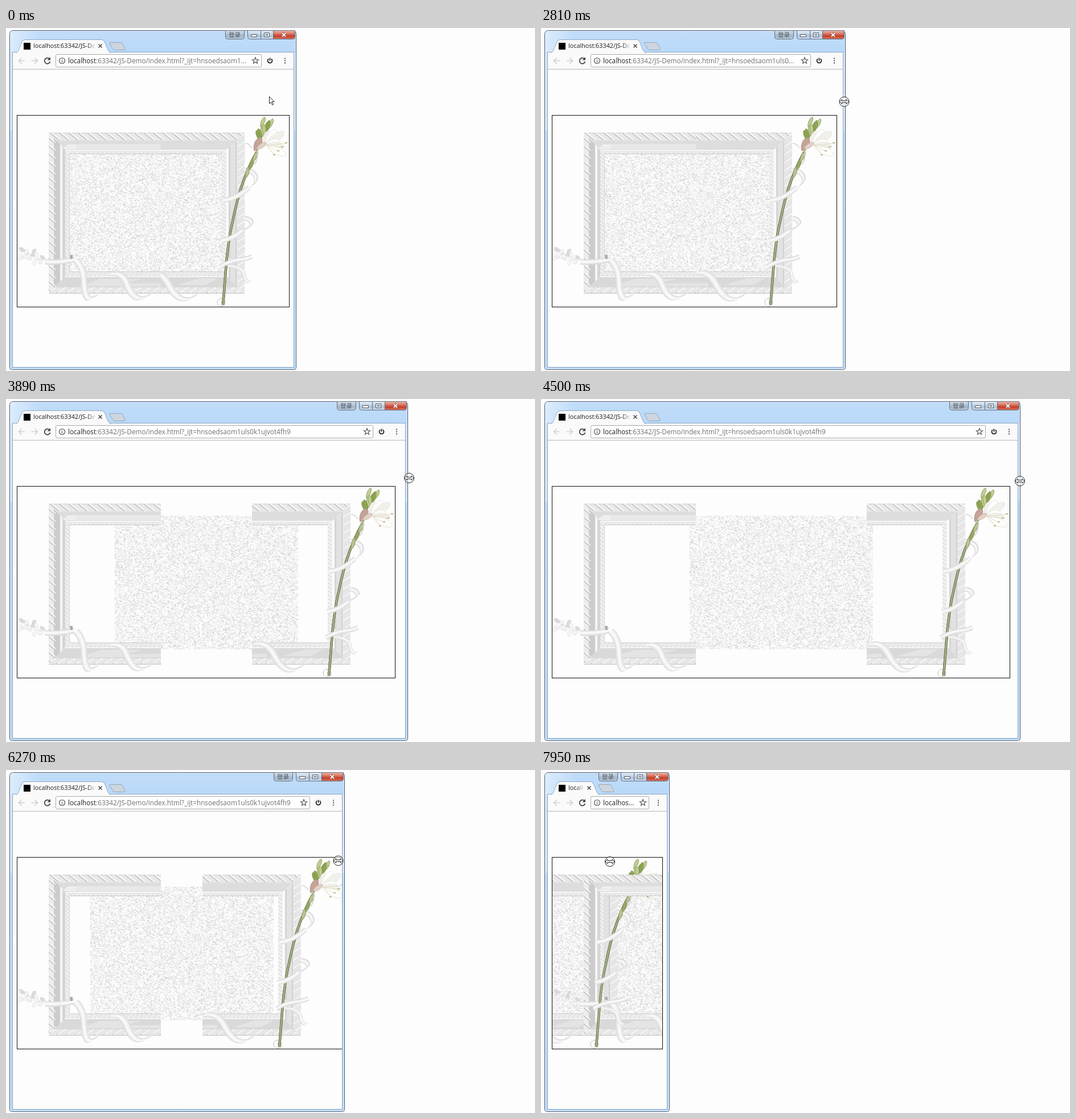
These frames come from a looping animation (929x603 px, 8000 ms). An HTML page with a canvas:

```html
<!DOCTYPE html>
<html lang="en">
<head>
<meta charset="utf-8">
<title>Responsive frame</title>
<style>
html, body { margin: 0; width: 929px; height: 603px; overflow: hidden; background: #fff; }
canvas { display: block; }
</style>
</head>
<body>
<canvas id="stage" width="929" height="603"></canvas>
<script>
const ctx = document.getElementById('stage').getContext('2d');
const LOOP = 8000;
const GRAB = 2390;
const MIN_EDGE = 226;
const UI = '"Open Sans", "Noto Sans", sans-serif';
const HOST = 'localhost';
const ADDRESS = HOST + ':63342/JS-Demo/index.html?_ijt=hnsoedsaom1uls0k1ujvot4fh9';

// ---- motion ----

// the screen refreshes in runs: start, interval, count
const TICKS = [
  [0, 0, 1], [1340, 120, 3], [1730, 120, 4], [2390, 120, 2], [2660, 150, 2], [2930, 120, 4],
  [3440, 150, 6], [4350, 150, 3], [4770, 150, 4], [5340, 120, 3], [5730, 150, 2],
  [6000, 150, 2], [6270, 120, 5], [6900, 150, 3], [7320, 120, 5], [7950, 0, 1]
].flatMap(([from, step, n]) => Array.from({ length: n }, (_, i) => from + i * step));

const HAND_X = [
  [0, 462], [1220, 462], [2090, 507], [2390, 508], [2810, 532.5], [3290, 582], [3440, 610],
  [3890, 708], [4190, 801], [4500, 841], [4770, 884], [5220, 910], [5340, 905], [5580, 846],
  [6000, 682], [6270, 583.5], [6750, 463.5], [7050, 380], [7800, 125], [7950, 121]
];
const HAND_Y = [[0, 120], [1970, 121], [2090, 129], [2810, 129.5], [5220, 150.5], [6750, 163.5], [7950, 161]];

function along(keys, t) {
  const i = keys.findIndex(k => k[0] > t);
  if (i < 0) return keys[keys.length - 1][1];
  const [t0, a] = keys[i - 1], [t1, b] = keys[i];
  return a + (b - a) * (t - t0) / (t1 - t0);
}

const handX = n => along(HAND_X, TICKS[Math.max(0, n)]);

// the window trails the hand, and the page trails the window
function edgeAt(n) {
  if (n < 0 || TICKS[n] < GRAB) return 510;
  const x = handX(n);
  return Math.max(MIN_EDGE, Math.round(x + 4 - 0.17 * (x - handX(n - 1))));
}

function pageAt(n) {
  const edge = edgeAt(n);
  return Math.round(edge - 13 - 0.3 * (edge - edgeAt(n - 1)));
}

// ---- drawing helpers ----

function layer(w, h, ox, oy, paint) {
  const c = document.createElement('canvas');
  c.width = w;
  c.height = h;
  const g = c.getContext('2d');
  g.translate(-ox, -oy);
  paint(g);
  return c;
}

function rect(g, color, x, y, w, h) {
  g.fillStyle = color;
  g.fillRect(x, y, w, h);
}

function path(g, d, stroke, width, fill) {
  const p = new Path2D(d);
  if (fill) { g.fillStyle = fill; g.fill(p); }
  if (stroke) { g.strokeStyle = stroke; g.lineWidth = width; g.stroke(p); }
}

function ramp(x0, y0, x1, y1, ...colors) {
  const r = ctx.createLinearGradient(x0, y0, x1, y1);
  colors.forEach((c, i) => r.addColorStop(i / (colors.length - 1), c));
  return r;
}

const grey = v => `rgb(${v},${v},${v})`;

let seed = 20;
const rnd = () => (seed = (seed * 16807) % 2147483647) / 2147483647;

// ---- artwork, laid out for a box spanning x 20..497 ----

// slanted leaves repeated along a moulding
function rope(g, x, y, dx, dy, a, b, w) {
  for (let px = x, py = y; px < 420 && py < 468; px += dx, py += dy) {
    path(g, `M${px} ${py}l${a} ${b}`, '#c6c6c6', w);
    path(g, `M${px + w} ${py - w / 2}l${a} ${b}`, '#fbfbfb', w);
  }
}

// bands: thickness and grey level, from the top or left
function rail(g, outline, upright, start, bands, ropes) {
  g.save();
  g.clip(new Path2D(outline));
  let at = start;
  for (const [size, v] of bands) {
    if (upright) rect(g, grey(v), at, 184, size, 284);
    else rect(g, grey(v), 75, at, 345, size);
    at += size;
  }
  ropes.forEach(r => rope(g, ...r));
  g.restore();
}

function frame(g) {
  rail(g, 'M75 184H419L379 222H112Z', false, 184,
    [[1, 205], [13, 232], [16, 221], [2, 246], [5, 233], [1, 208]],
    [[78, 185, 16.5, 0, 15, 12, 2], [97, 221, 8, 0, 6, -5, 1.2]]);
  rail(g, 'M75 184L112 222V428L75 467Z', true, 75,
    [[9, 236], [11, 204], [4, 245], [5, 213], [7, 238], [1, 208]],
    [[75, 180, 0, 14, 10, 8, 1.8], [104, 205, 0, 7, 7, 5, 1]]);
  rail(g, 'M379 222L419 184V467L379 428Z', true, 379,
    [[8, 240], [4, 250], [3, 212], [9, 226], [2, 210], [15, 230]],
    [[403, 196, 0, 14, 14, -9, 1.8], [379, 210, 0, 7, 7, 5, 1]]);
  rail(g, 'M75 467L112 428H379L419 467Z', false, 428,
    [[1, 204], [7, 234], [2, 246], [18, 217], [10, 231], [1, 198]],
    [[100, 436, 8, 0, 6, -6, 1.2], [72, 466, 16.5, 0, 14, -9, 2]]);
  path(g, 'M128 454L165 441H240L205 449L272 448V454ZM300 452L340 440H372L350 452Z', null, 0, '#e4e4e4');
}

// flat ribbon: one curve swept along a broad nib
function ribbon(g, d, dx, dy) {
  const n = Math.hypot(dx, dy);
  for (let i = 0; i <= n; i++) {
    g.save();
    g.translate((i / n - 0.5) * dx, (i / n - 0.5) * dy);
    path(g, d, grey(Math.round(218 + 32 * Math.sin(Math.PI * i / n))), 1.6);
    g.restore();
  }
}

function petal(g, x, y, len, wide, angle, fill, edge) {
  g.save();
  g.translate(x, y);
  g.rotate(angle);
  path(g, `M0 0C${len * 0.3} ${-wide} ${len * 0.9} ${-wide} ${len} 0C${len * 0.9} ${wide} ${len * 0.3} ${wide} 0 0Z`,
    edge, 0.7, fill);
  g.restore();
}

const leftArt = layer(252, 337, 20, 154, g => {
  frame(g);
  path(g, 'M98 213L110 204H272V213Z', null, 0, '#e8e8e8');
  path(g, 'M106 207H124M102 211H122', '#fff', 1);
  for (let i = 0; i < 18; i++) {
    petal(g, 24 + i * 2.4, 396 + i * 0.6 + (i % 3 - 1) * 5, 10, 4, i * 1.3, i % 3 ? '#f6f6f6' : '#dadada', '#dcdcdc');
  }
  ribbon(g, 'M68 411Q95 413 120 407', 1, 8);
  ribbon(g, 'M122 407Q136 420 137 444Q138 474 147 476Q154 476 160 467', 10, -6);
  ribbon(g, 'M184 432Q204 428 212 449Q222 475 236 475Q249 474 255 466', 10, -6);
  path(g, 'M112 399h5v7h-4z', null, 0, '#aaa');
});

const rightFrame = layer(251, 337, 246, 154, g => {
  frame(g);
  ribbon(g, 'M250 430Q272 426 284 448Q298 476 314 477Q328 477 333 468', 10, -6);
});

const plant = layer(251, 337, 246, 154, g => {
  ribbon(g, 'M418 249Q434 250 439 262Q441 272 430 279', 5, -5);
  ribbon(g, 'M418 334Q430 335 432 344Q429 351 413 357', 5, -5);
  ribbon(g, 'M392 408Q418 409 432 402', 2, 6);
  ribbon(g, 'M390 418Q420 420 419 437Q421 446 429 447', 5, -3);
  path(g, 'M371 482a7 7 0 1 0 14 0a7 7 0 1 0 -14 0M379 480a3 3 0 1 0 5 2', '#cfcfcf', 1);
  const stem = 'M381 487C386 430 388 380 398 340C406 300 416 262 440 218';
  path(g, stem, '#75845a', 4.4);
  path(g, stem, '#bcc5a2', 1.4);
  ribbon(g, 'M381 303Q402 302 427 281', 3, 7);
  ribbon(g, 'M379 374Q398 371 414 357', 3, 7);
  ribbon(g, 'M376 420Q390 410 412 407', 2, 6);
  for (let i = 0; i < 3; i++) {
    petal(g, 421 + i * 6, 264 - i * 14, 21, 4, -1.3 + i * 0.08, i % 2 ? '#97a765' : '#b9c391', '#84945c');
  }
  path(g, 'M440 220Q446 195 455 174', '#97a865', 3);
  for (let i = 0; i < 8; i++) {
    petal(g, 446 + (i * 5) % 17, 198 - (i * 7) % 25, 19, 4, -1.9 + (i % 4) * 0.25,
      i % 2 ? '#c3cc92' : '#8da552', '#7d9350');
  }
  for (let i = 0; i < 6; i++) {
    petal(g, 456, 206, 26 + (i % 3) * 7, 9, -1.35 + i * 0.36, i % 2 ? '#fdfdfc' : '#f2f0ea', '#e3e0d8');
  }
  for (let i = 0; i < 4; i++) {
    path(g, `M458 206Q${474 - i * 2} ${206 + i * 4} ${492 - i * 7} ${202 + i * 7}`, '#d8cfb0', 0.7);
    rect(g, '#c8b583', 490 - i * 7, 201 + i * 7, 4, 2);
  }
  petal(g, 436, 216, 26, 8, -1.1, '#c4a398', '#a98a7f');
  petal(g, 440, 213, 20, 5, -0.6, '#e2d0c5', '#c3aaa0');
  path(g, 'M420 203Q426 202 432 211M436 240Q444 229 441 216', '#d4d4d4', 1.5);
});

const grain = layer(323, 235, 0, 0, g => {
  rect(g, '#fcfcfc', 0, 0, 323, 235);
  for (let i = 0; i < 17000; i++) {
    const x = rnd() * 323, y = rnd() * 235, len = 0.8 + rnd() * 2;
    path(g, `M${x} ${y}l${len} ${(rnd() - 0.35) * 2}`, grey(Math.floor(190 + rnd() * 44)), 0.75);
  }
});

function page(right) {
  const x = right - 251;
  ctx.save();
  ctx.beginPath();
  ctx.rect(20, 154, right - 20, 337);
  ctx.clip();
  ctx.drawImage(grain, Math.round((right + 20) / 2 - 161.5), 205);
  ctx.drawImage(rightFrame, x, 154);
  ctx.drawImage(plant, x, 154);
  ctx.drawImage(leftArt, 20, 154);
  // lower part of the plant stays in front
  ctx.drawImage(plant, 0, 69, 251, 268, x, 223, 251, 268);
  ctx.restore();
  ctx.strokeStyle = '#111';
  ctx.lineWidth = 1;
  ctx.strokeRect(19.5, 153.5, right - 19, 337);
}

// ---- browser window ----

function glass(x, w, colors, radii) {
  ctx.beginPath();
  ctx.roundRect(x + 0.5, 4.5, w, 15, radii);
  ctx.fillStyle = ramp(0, 5, 0, 19, ...colors);
  ctx.fill();
  ctx.strokeStyle = '#5b6e84';
  ctx.lineWidth = 1;
  ctx.stroke();
}

function captions(r) {
  const pale = ['#e6eef7', '#cbd9e8', '#aec2d8', '#cfdfef'];
  glass(r - 125, 33, ['#d5dde6', '#bdc8d4', '#a5b3c3', '#c3d0de'], [0, 0, 4, 4]);
  glass(r - 86, 23, pale, [0, 0, 0, 4]);
  glass(r - 63, 22, pale, 0);
  glass(r - 41, 38, ['#eeb3a4', '#dc7b67', '#c23f2a', '#d9745c'], [0, 0, 4, 0]);
  ctx.fillStyle = '#4a5665';
  ctx.font = '10.5px "Noto Sans CJK SC", "Noto Sans CJK", sans-serif';
  ctx.fillText('登录', r - 119, 16);
  const ink = '#4c5866';
  path(ctx, `M${r - 79.5} 11.5h10v4h-10z`, ink, 1, '#fff');
  path(ctx, `M${r - 56.5} 8.5h9v7h-9zM${r - 54} 11h4v2h-4z`, ink, 1, '#fff');
  const cross = `M${r - 25} 9l6 6m0 -6l-6 6`;
  path(ctx, cross, '#7a3a34', 3.4);
  path(ctx, cross, '#fff', 2);
}

function tab(r) {
  const cut = Math.max(0, 307 - r), end = 183 - cut, stop = 157 - cut;
  path(ctx, `M18 43.5C22 42 23 36 27 26Q29 20.5 33 20.5H${end - 15}Q${end - 11} 20.5 ${end - 9} 26C${end - 5} 36 ${end - 4} 42 ${end + 1} 43.5`,
    '#8fa9c4', 1, '#fafafa');
  path(ctx, `M${end} 25.5h18q3 0 4 3l4 8q1 2 -2 2h-16q-3 0 -4 -3l-5 -8q-1 -2 1 -2z`, '#93a7bb', 1, '#cdd5de');
  rect(ctx, '#000', 31, 26, 12, 12);
  ctx.save();
  ctx.beginPath();
  ctx.rect(46, 22, stop - 46, 20);
  ctx.clip();
  ctx.fillStyle = ramp(stop - 14, 0, stop, 0, '#1c1c1c', 'rgba(28,28,28,0)');
  ctx.font = '10.8px ' + UI;
  ctx.fillText('localhost:63342/JS-Demo', 48, 35);
  ctx.restore();
  path(ctx, `M${162.5 - cut} 28.5l6 6m0 -6l-6 6`, '#444', 1.5);
}

ctx.font = '100px ' + UI;
const ADDRESS_FONT = (39100 / ctx.measureText(ADDRESS).width).toFixed(2) + 'px ' + UI;

function address(limit) {
  ctx.font = ADDRESS_FONT;
  let text = ADDRESS;
  for (let n = ADDRESS.length - 1; 109 + ctx.measureText(text).width > limit; n--) {
    text = ADDRESS.slice(0, n) + '...';
  }
  const head = text.startsWith(HOST) ? HOST : text;
  ctx.fillStyle = '#222';
  ctx.fillText(head, 109, 62);
  ctx.fillStyle = '#707070';
  ctx.fillText(text.slice(head.length), 109 + ctx.measureText(head).width, 62);
}

function star(x, y) {
  let d = '';
  for (let i = 0; i < 10; i++) {
    const a = -Math.PI / 2 + i * Math.PI / 5, q = i % 2 ? 2.5 : 5.8;
    d += (i ? 'L' : 'M') + (x + q * Math.cos(a)) + ' ' + (y + q * Math.sin(a));
  }
  path(ctx, d + 'Z', '#555', 1.2);
}

function toolbar(r) {
  const narrow = r < 290, end = r - (narrow ? 36 : 61);
  rect(ctx, '#fafafa', 12, 43, r - 17, 30);
  rect(ctx, '#b8b8ba', 12, 72, r - 17, 1);
  path(ctx, 'M33 57.5H22.5M27.5 52.5l-5 5l5 5M45 57.5H55.5M50.5 52.5l5 5l-5 5', '#cfcfcf', 1.6);
  path(ctx, 'M76.5 54.5A5 5 0 1 0 77.5 59', '#444', 1.8);
  path(ctx, 'M78 51v5.5h-5.5z', null, 0, '#444');
  ctx.beginPath();
  ctx.roundRect(87.5, 46.5, end - 88, 22, 2);
  ctx.fillStyle = '#fff';
  ctx.fill();
  ctx.strokeStyle = '#a9a9ab';
  ctx.lineWidth = 1;
  ctx.stroke();
  path(ctx, 'M93.5 57.5a5 5 0 1 0 10 0a5 5 0 1 0 -10 0M98.5 56.5v4M98.5 54v1.3', '#555', 1.2);
  address(end - 24);
  star(end - 11, 57.5);
  if (!narrow) path(ctx, `M${r - 48.8} 54.2a4 4 0 1 0 4.6 0M${r - 46.5} 52.5v5`, '#222', 1.7);
  for (let y = 53; y <= 61; y += 4) rect(ctx, '#555', r - 21, y - 0.5, 2, 2);
}

function browser(r, right) {
  ctx.beginPath();
  ctx.roundRect(6.5, 4.5, r - 7, 596, [6, 6, 4, 4]);
  ctx.fillStyle = ramp(0, 5, 0, 43, '#c0dcf8', '#b9d9fa');
  ctx.fill();
  ctx.save();
  ctx.clip();
  for (const x of [7, r - 5]) {
    rect(ctx, '#d3e6f9', x, 43, 5, 138);
    rect(ctx, '#b9dafb', x, 181, 5, 420);
  }
  rect(ctx, ramp(7, 0, 60, 0, 'rgba(240,248,255,.6)', 'rgba(240,248,255,0)'), 7, 5, 53, 38);
  ctx.restore();
  ctx.strokeStyle = '#41566d';
  ctx.lineWidth = 1;
  ctx.stroke();
  ctx.strokeStyle = 'rgba(255,255,255,.6)';
  ctx.beginPath();
  ctx.roundRect(7.5, 5.5, r - 9, 594, [5, 5, 3, 3]);
  ctx.stroke();

  ctx.save();
  ctx.beginPath();
  ctx.rect(12, 43, r - 17, 553);
  ctx.clip();
  rect(ctx, '#fdfdfd', 12, 43, r - 17, 553);
  page(right);
  toolbar(r);
  ctx.restore();
  ctx.strokeStyle = '#8aa5c0';
  ctx.lineWidth = 1;
  ctx.strokeRect(11.5, 42.5, r - 16, 554);
  tab(r);
  captions(r);
}

function pointer(x, y, resizing) {
  ctx.save();
  ctx.translate(x, y);
  if (resizing) {
    path(ctx, 'M-8.5 0a8.5 8.5 0 1 0 17 0a8.5 8.5 0 1 0 -17 0', '#222', 1, 'rgba(255,255,255,.55)');
    path(ctx, 'M-8 0L-4 -4V-1.5H4V-4L8 0L4 4V1.5H-4V4Z', '#222', 1, '#fff');
  } else {
    path(ctx, 'M.5 .5V13L3.4 10.3L5.6 15.3L7.6 14.4L5.4 9.5H9Z', '#222', 1, '#fff');
  }
  ctx.restore();
}

function draw(t) {
  const n = TICKS.filter(v => v <= t).length - 1;
  rect(ctx, '#fdfdfd', 0, 0, 929, 603);
  browser(edgeAt(n), pageAt(n));
  pointer(handX(n), along(HAND_Y, TICKS[n]), TICKS[n] >= 2090);
}

const start = performance.now();
function loop() {
  draw((performance.now() - start) % LOOP);
  requestAnimationFrame(loop);
}
loop();
</script>
</body>
</html>
```
